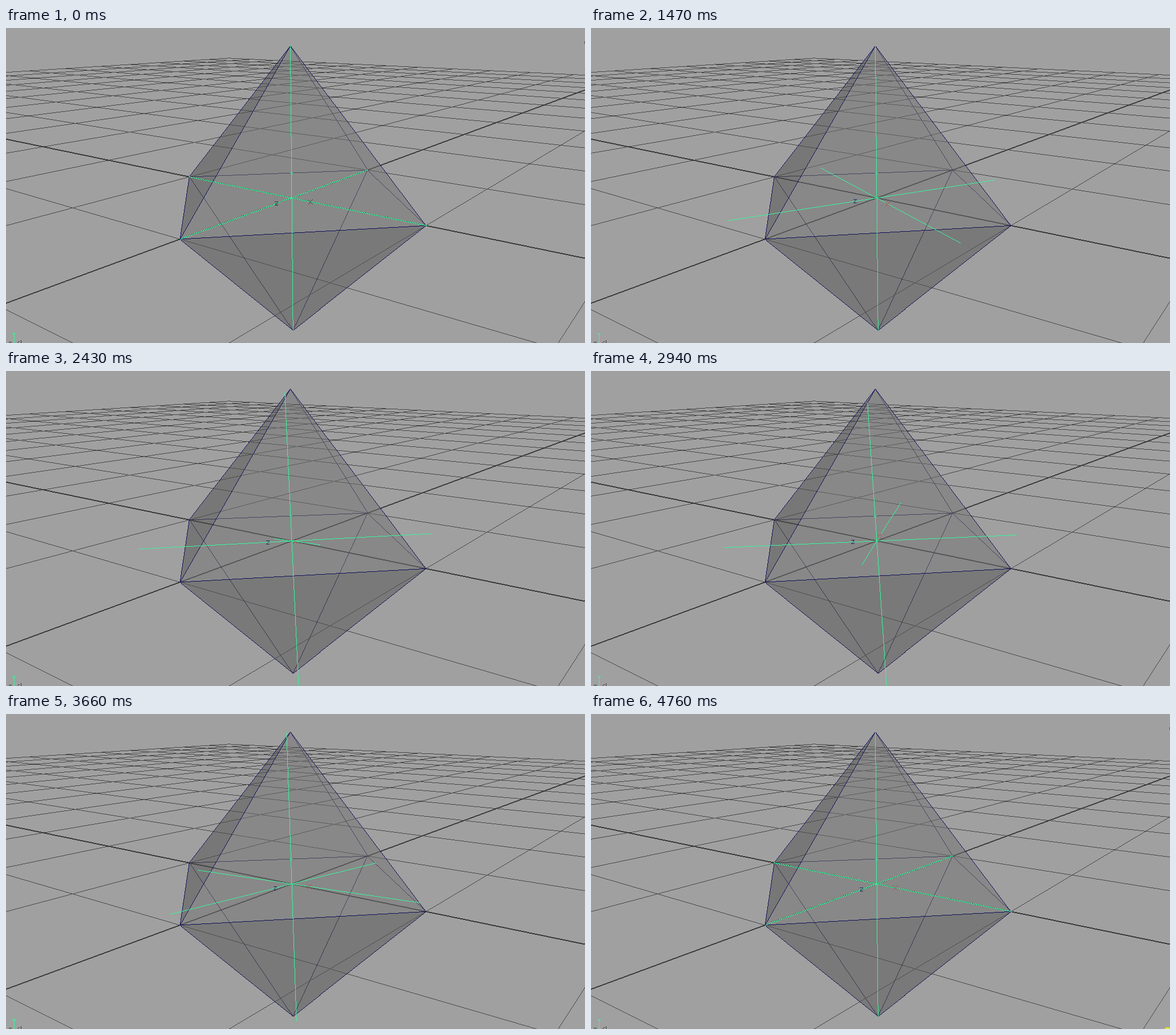
Write an HTML page with a canvas that moves like this. It is 1015 px wide and 552 px high and loops after 4.82 s.

```html
<!DOCTYPE html>
<html lang="en">
<head>
<meta charset="utf-8">
<title>Rotating locator</title>
<style>
  html, body { margin: 0; width: 100%; height: 100%; overflow: hidden; background: #a0a0a0; }
  canvas { display: block; }
</style>
</head>
<body>
<canvas id="stage" width="1015" height="552"></canvas>
<script>
const LOOP = 4820, STEP = 40, GRID = 12;
const GREEN = '#38f59c', NAVY = '#11115a';
const stage = document.getElementById('stage');
const view = stage.getContext('2d');
const backdrop = document.createElement('canvas');
backdrop.width = stage.width;
backdrop.height = stage.height;

// Perspective camera: homogeneous screen vectors of the origin and the unit axes.
const ORIGIN = [501, 297.9, 1];
const AXES = [[136.4, 1.9, -.1343], [-36.4, -268.1, -.068], [-254.4, 1.3, -.1915]];
const mix = (a, b, k) => a.map((v, i) => v + (b[i] - v) * k);
const scale = (v, k) => v.map(n => n * k);
const camera = p => ORIGIN.map((o, i) => o + p[0] * AXES[0][i] + p[1] * AXES[1][i] + p[2] * AXES[2][i]);
const flatten = h => [h[0] / h[2], h[1] / h[2]];
const project = p => flatten(camera(p));

// Hard-edged line, one block per pixel along its longer side.
function line(g, a, b, color, size = 1, dotted = false) {
  const dx = b[0] - a[0], dy = b[1] - a[1], inset = (size - 1) / 2;
  const steps = Math.max(1, Math.ceil(Math.max(Math.abs(dx), Math.abs(dy))));
  const wide = Math.abs(dx) > Math.abs(dy);
  g.fillStyle = color;
  for (let i = 0; i <= steps; i++) {
    if (dotted && i % 3 === 2) continue;
    const x = Math.floor(a[0] + dx * i / steps - (wide ? 0 : inset));
    const y = Math.floor(a[1] + dy * i / steps - (wide ? inset : 0));
    g.fillRect(x, y, wide ? 1 : size, wide ? size : 1);
  }
}

// 3D line, cut where it passes behind the camera.
function line3(g, p, q, color, size, dotted) {
  const near = .12;
  let a = camera(p), b = camera(q);
  if (a[2] < near && b[2] < near) return;
  const cut = mix(a, b, (near - a[2]) / (b[2] - a[2] || 1));
  if (a[2] < near) a = cut;
  if (b[2] < near) b = cut;
  line(g, flatten(a), flatten(b), color, size, dotted);
}

function drawBackdrop() {
  const g = backdrop.getContext('2d');
  g.fillStyle = '#a0a0a0';
  g.fillRect(0, 0, backdrop.width, backdrop.height);
  for (let i = -GRID; i <= GRID; i++) {
    const color = i ? '#484848' : '#3a3a3a', size = i ? 1 : 2;
    line3(g, [-GRID, 0, i], [GRID, 0, i], color, size);
    line3(g, [i, 0, -GRID], [i, 0, GRID], color, size);
  }

  const top = [0, 1, 0], bottom = [0, -1, 0], left = [-1, 0, 0];
  const right = [1, 0, 0], front = [0, 0, 1], back = [0, 0, -1];
  const edges = (list, color) => list.forEach(([a, b]) => line3(g, a, b, color));
  edges([[top, back], [left, back], [back, right], [left, bottom], [back, bottom]], '#1c1c50');

  const face = (shade, ...corners) => {
    g.fillStyle = `rgba(${shade},${shade},${shade},.5)`;
    g.beginPath();
    corners.map(project).forEach(c => g.lineTo(...c));
    g.fill();
  };
  face(115, top, front, right);
  face(80, top, left, front);
  face(84, bottom, front, right);
  edges([[top, left], [top, front], [top, right], [left, front],
    [front, right], [front, bottom], [right, bottom]], NAVY);

  // Corner axis icon
  line(g, [14, 534], [14, 552], GREEN);
  line(g, [11, 534], [14, 538], GREEN);
  line(g, [17, 534], [14, 538], GREEN);
  line(g, [5, 550], [9, 550], '#333');
  line(g, [20, 551], [23, 549], '#333');
  line(g, [26, 547], [26, 552], '#333');
}

// Rotation keys in degrees: about X, then Y, then Z.
const REST = [0, 0, 0], TURNED = [0, -45, 0], TILTED = [-24.8, -38.8, 36.4];
const smooth = k => k * k * (3 - 2 * k);

function rotationAt(t) {
  const q = Math.floor((t - 20) / STEP) * STEP + 20;
  if (q < 920 || q >= 3880) return REST;
  if (q < 1900) return mix(REST, TURNED, (q - 900) / 1000);
  if (q < 2850) return mix(TURNED, TILTED, (q - 1900) / 950);
  return mix(TILTED, REST, smooth((q - 2850) / 1030));
}

function rotate([x, y, z], angles) {
  const [a, b, c] = angles.map(d => d * Math.PI / 180);
  const { sin, cos } = Math;
  [y, z] = [y * cos(a) - z * sin(a), y * sin(a) + z * cos(a)];
  [x, z] = [x * cos(b) + z * sin(b), z * cos(b) - x * sin(b)];
  return [x * cos(c) - y * sin(c), x * sin(c) + y * cos(c), z];
}

// Letter strokes around the label centre
const LETTERS = {
  x: [[-4, -3, 3, 4], [3, -4, -4, 4]],
  y: [[-2, -4, 0, 0], [2, -4, 0, 0], [0, 0, 0, 4]],
  z: [[-3, -3, 2, -3], [2, -3, -3, 3], [-3, 3, 2, 3]]
};

function drawLocator(t) {
  const angles = rotationAt(t), atRest = angles === REST, idle = t < 940;
  const colors = { x: idle ? '#444' : '#b84646', y: GREEN, z: idle ? '#333' : '#223064' };
  ['x', 'y', 'z'].forEach((name, i) => {
    const unit = rotate([0, 1, 2].map(n => +(n === i)), angles);
    const onGrid = atRest && name !== 'y';
    line3(view, scale(unit, -1), unit, GREEN, onGrid ? 2 : 1, onGrid);
    const [cx, cy] = project(scale(unit, .16));
    for (const [x1, y1, x2, y2] of LETTERS[name])
      line(view, [cx + x1, cy + y1], [cx + x2, cy + y2], colors[name]);
  });
}

function frame() {
  const t = performance.now() % LOOP;
  view.drawImage(backdrop, 0, 0);
  drawLocator(t);
  if (t < 940 || t >= 3950) line(view, [1014, 23], [1014, 27], '#555');
  if (t >= 4760) {
    view.fillStyle = '#e6e23c';
    view.beginPath();
    view.arc(1011, 557, 8, 0, 7);
    view.fill();
  }
  requestAnimationFrame(frame);
}

drawBackdrop();
frame();
</script>
</body>
</html>
```
